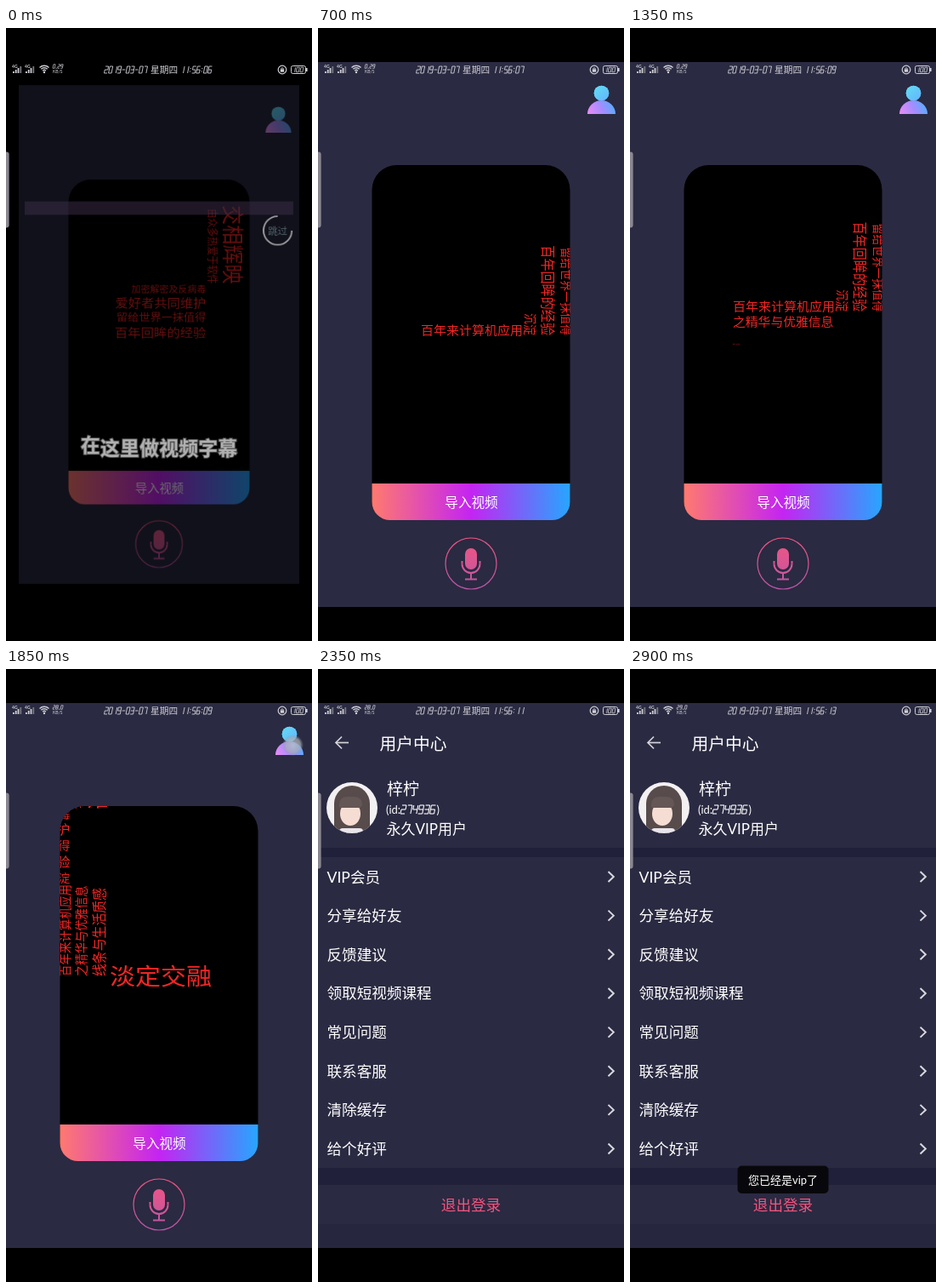
Animation of 360x720 px, one loop 2950 ms. Source, as an HTML page with a canvas:

```html
<!DOCTYPE html>
<html lang="zh-CN">
<head>
<meta charset="utf-8">
<style>
html, body { margin: 0; width: 100%; height: 100%; overflow: hidden; background: #000; }
canvas { display: block; }
</style>
</head>
<body>
<canvas id="stage" width="360" height="720"></canvas>
<script>
const LOOP = 2950, SWITCH = 300;
const BG = '#2a2a42', BAND = '#20203a', RED = '#f42626';
const CJK = '"Noto Sans CJK SC", "Noto Sans CJK", sans-serif';
const LATIN = 'Lato, ' + CJK;
const view = document.getElementById('stage').getContext('2d');
const layer = document.createElement('canvas');
layer.width = 360; layer.height = 720;
let g = view;

const clamp = v => Math.max(0, Math.min(1, v));
const ramp = (t, a, b) => { const k = clamp((t - a) / (b - a)); return k * k * (3 - 2 * k); };
const mix = (a, b, k) => a + (b - a) * k;

function text(s, x, y, size, color = '#fff', align = 'left', weight = 400, font = LATIN) {
  g.font = `${weight} ${size}px ${font}`;
  g.textAlign = align;
  g.textBaseline = 'alphabetic';
  g.fillStyle = color;
  g.fillText(s, x, y + size * 0.37);
}
function rect(x, y, w, h, color, r = 0) {
  g.fillStyle = color;
  g.beginPath();
  g.roundRect(x, y, w, h, r);
  g.fill();
}
function disc(x, y, r, color) {
  g.fillStyle = color;
  g.beginPath();
  g.arc(x, y, r, 0, 7);
  g.fill();
}
function line(points, color, width) {
  g.strokeStyle = color;
  g.lineWidth = width;
  g.beginPath();
  points.forEach(([x, y]) => g.lineTo(x, y));
  g.stroke();
}
function arc(x, y, r, a, b, color, width) {
  g.strokeStyle = color;
  g.lineWidth = width;
  g.beginPath();
  g.arc(x, y, r, a, b);
  g.stroke();
}
function blend(x0, y0, x1, y1, ...colors) {
  const f = g.createLinearGradient(x0, y0, x1, y1);
  colors.forEach((c, i) => f.addColorStop(i / (colors.length - 1), c));
  return f;
}

// Slanted seven-segment lettering; segments a..g
const SEG = {
  0: 'abcdef', 1: 'bc', 2: 'abged', 3: 'abgcd', 4: 'fgbc', 5: 'afgcd',
  6: 'afgedc', 7: 'abc', 8: 'abcdefg', 9: 'abcdfg', '-': 'g'
};
const ENDS = {
  a: [0, 0, 1, 0], b: [1, 0, 1, 1], c: [1, 1, 1, 2], d: [0, 2, 1, 2],
  e: [0, 1, 0, 2], f: [0, 0, 0, 1], g: [0, 1, 1, 1]
};
function digits(s, x, y, w, h, step, color, width = 0.9) {
  const at = (px, py) => [x + px * w + (1 - py / 2) * h * 0.2, y + (py - 1) * h / 2];
  for (const c of s) {
    if (c === ':' || c === '.') {
      for (const p of c === ':' ? [0.6, 1.5] : [2]) {
        const [dx, dy] = at(0.1, p);
        rect(dx, dy - 0.5, 1, 1, color);
      }
      x += step * 0.68;
      continue;
    }
    for (const k of SEG[c]) {
      const [a, b, d, e] = ENDS[k];
      line([at(a, b), at(d, e)], color, width);
    }
    x += step;
  }
}

function statusBar(t) {
  const ink = '#cfcfd6';
  for (const x of [7, 22]) {
    text('4G', x, 45, 5, ink, 'left', 700);
    for (let i = 0; i < 4; i++) rect(x + 1 + i * 2.8, 51 - i * 2, 1.8, 2 + i * 2, i < 3 ? ink : '#77777f');
  }
  for (const r of [2.6, 5.2, 7.8]) arc(45, 52, r, -2.35, -0.79, ink, 1.4);
  disc(45, 52, 1.2, ink);
  digits(t < 1500 ? '0.29' : t < 2400 ? '28.0' : '29.0', 55, 45, 2.2, 4.5, 3.4, ink, 0.7);
  text('KB/S', 55, 51.5, 5, ink);
  digits('2019-03-07', 115.5, 49, 3.5, 8, 5.1, ink);
  text('星期四', 170, 49, 10.7, ink);
  const tick = [400, 850, 1250, 1870, 2090, 2480, 2860].filter(s => t >= s).length;
  digits('11:56:' + String(6 + tick).padStart(2, '0'), 205, 49, 3.5, 8, 5.1, ink);
  arc(325, 49, 4.8, 0, 7, ink, 1.2);
  rect(322.8, 48.3, 4.4, 3.4, ink);
  arc(325, 48.2, 1.4, Math.PI, 0, ink, 0.9);
  g.strokeStyle = ink;
  g.lineWidth = 1;
  g.beginPath();
  g.roundRect(335.5, 44.5, 17, 9, 2);
  g.stroke();
  rect(353, 47, 1.6, 4, ink);
  digits('100', 336.5, 49, 3, 5.5, 4.7, ink, 0.8);
}

// Rows: [text, character size, centre above the block's corner, start, end of growth]
const OLD = [['交相辉映', 28, -33.5], ['由众多热爱于软件', 13.4, -8.5]];
const MID = [
  ['加密解密及反病毒', 12, -91], ['爱好者共同维护', 16.7, -72],
  ['留给世界一抹值得', 14.4, -51.5], ['百年回眸的经验', 16.8, -30], ['沉淀', 14.4, -9, 30, 210]
];
const NEW = [
  ['百年来计算机应用', 15, -52, 480, 640], ['之精华与优雅信息', 14.8, -32, 820, 1020],
  ['线条与生活质感', 16.5, -11, 1325, 1480]
];
function rows(list, t, align) {
  for (const [s, size, y, a, b] of list) {
    const k = a === undefined ? 1 : ramp(t, a, b);
    if (!k) continue;
    g.save();
    g.translate(0, y + size / 2 * (1 - k));
    g.scale(k, k);
    text(s, 0, 0, size, RED, align, 500, CJK);
    g.restore();
  }
}
function verse(t) {
  const turn = Math.PI / 2;
  g.save();
  g.translate(182, 361);
  g.scale(1, 0.9);
  const k = ramp(t, 1580, 1760);
  if (k) {
    g.save();
    g.scale(k, k);
    text('淡定交融', 0, 0, 30, RED, 'center', 500, CJK);
    g.restore();
  }
  g.translate(-61, 0);
  g.rotate(-turn * ramp(t, 1500, 1700));
  g.translate(0, 45.5 - 25 * ramp(t, 800, 1000) - 20.5 * ramp(t, 1290, 1460));
  rows(NEW, t, 'left');
  g.translate(119.5, -45.5);
  g.rotate(turn * ramp(t, 300, 500));
  g.translate(0, 25.5 * (1 - ramp(t, 0, 210)));
  rows(MID, t, 'right');
  g.translate(0, -99);
  g.rotate(turn);
  rows(OLD, t, 'right');
  g.restore();
}

function home(t) {
  rect(0, 40, 360, 640, BG);
  disc(333.5, 76.5, 8.8, blend(325, 68, 342, 86, '#63dcf2', '#62b4ff'));
  g.fillStyle = blend(318, 100, 348, 86, '#e68cf4', '#a58cff', '#4fb0ff');
  g.beginPath();
  g.ellipse(333.5, 101, 16.5, 16, 0, Math.PI, 0);
  g.fill();
  disc(333.5, 76.5, 8.8, blend(325, 68, 342, 86, '#63dcf2', '#62b4ff'));

  g.save();
  g.beginPath();
  g.roundRect(63.5, 161, 233, 417, [29, 29, 21, 21]);
  g.clip();
  rect(63, 161, 234, 417, '#000');
  verse(t);
  rect(63, 535, 234, 43, blend(63, 0, 297, 0, '#ff7a6e', '#c424f2', '#26a6ff'));
  g.restore();
  text('导入视频', 180.5, 557, 15.6, '#fff', 'center');

  const pink = blend(0, 598, 0, 660, '#f4557f', '#bb55a8');
  arc(180, 629, 30, 0, 7, pink, 1.2);
  rect(173, 611, 14, 25, pink, 7);
  arc(180, 629.5, 10.5, 0, Math.PI, pink, 2);
  line([[169.5, 626], [169.5, 629.5]], pink, 2);
  line([[190.5, 626], [190.5, 629.5]], pink, 2);
  line([[180, 640], [180, 647]], pink, 2);
  line([[173, 647.5], [187, 647.5]], pink, 2);
}

function splash() {
  rect(0, 40, 360, 18, 'rgba(62,46,72,.75)');
  arc(339, 79, 19, 0, Math.PI * 1.5, '#d5d5d8', 2.2);
  text('跳过', 339, 79, 13, '#6f8a90', 'center');
  g.lineWidth = 2;
  g.strokeStyle = '#777';
  const s = '在这里做视频字幕';
  [...s].forEach((c, i) => {
    const x = 88 + i * 26.3, y = i ? 370 : 366;
    text(c, x, y, 26, '#fff', 'center', 900, CJK);
    g.strokeText(c, x, y + 26 * 0.37);
    g.fillText(c, x, y + 26 * 0.37);
  });
}

function avatar() {
  g.save();
  g.beginPath();
  g.arc(40, 163, 30, 0, 7);
  g.clip();
  rect(10, 133, 60, 60, '#f3f0f2');
  rect(19, 137, 42, 60, '#574b4b', [21, 21, 6, 6]);
  g.fillStyle = '#f6ddd3';
  g.beginPath();
  g.ellipse(38, 170, 12, 14, 0, 0, 7);
  g.fill();
  rect(25, 150, 27, 13, '#655756', [10, 10, 5, 3]);
  rect(25, 187, 28, 8, '#e8e4ea', 5);
  g.restore();
}

const MENU = ['VIP会员', '分享给好友', '反馈建议', '领取短视频课程', '常见问题', '联系客服', '清除缓存', '给个好评'];
function account(t) {
  rect(0, 40, 360, 640, BG);
  rect(0, 210, 360, 11, BAND);
  rect(0, 586, 360, 20, BAND);
  rect(0, 652, 360, 28, '#26263e');
  line([[36, 86.5], [21, 86.5]], '#d4d4da', 1.7);
  line([[28, 79.5], [21, 86.5], [28, 93.5]], '#d4d4da', 1.7);
  text('用户中心', 72.5, 87.5, 19.8);
  avatar();
  text('梓柠', 81, 141, 19);
  text('(id:', 80, 165, 13);
  digits('274936', 97, 165, 5, 10, 6.9, '#fff', 1.1);
  text(')', 139.5, 165, 13);
  text('永久VIP用户', 80.5, 188, 17);
  MENU.forEach((s, i) => {
    const y = 244 + i * 45.65;
    text(s, 10.5, y, 17.6);
    line([[341.5, y - 6], [347.8, y], [341.5, y + 6]], '#d8d8de', 2);
  });
  text('退出登录', 180, 629, 17.6, '#f4547f', 'center');
  const k = ramp(t, 2610, 2710);
  if (k) {
    g.globalAlpha = k;
    rect(126.5, 583.5, 107, 32.5, '#08080c', 5);
    text('您已经是vip了', 180, 600.5, 13, '#fff', 'center');
    g.globalAlpha = 1;
  }
}

function page(draw, t, scale = 1, cy = 360, alpha = 1) {
  g = layer.getContext('2d');
  g.clearRect(0, 0, 360, 720);
  draw(t);
  g = view;
  g.save();
  g.beginPath();
  g.rect(0, 40, 360, 640);
  g.clip();
  g.globalAlpha = alpha;
  g.translate(180, cy);
  g.scale(scale, scale);
  g.drawImage(layer, -180, -360);
  g.restore();
}
// One page grows in with a slight overshoot while the other sinks away
function swap(next, prev, t, u) {
  const v = u - 1;
  const grow = 1 + 1.8 * v ** 3 + 0.8 * v * v;
  page(next, t, 0.61 + 0.39 * grow, 360, 0.3 + 0.38 * u + 0.32 * u ** 6);
  page(prev, t, 1 - 0.4 * u, 360 + 380 * u + 93 * u * u, 1 - u);
}

function touch(x, y, t, a, b) {
  const k = Math.min(ramp(t, a, a + 50), 1 - ramp(t, b - 50, b));
  if (!k) return;
  g.globalAlpha = k;
  const f = g.createRadialGradient(x, y, 0, x, y, 12.5);
  f.addColorStop(0, 'rgba(185,192,200,.8)');
  f.addColorStop(0.7, 'rgba(165,172,182,.75)');
  f.addColorStop(1, 'rgba(140,150,165,0)');
  disc(x, y, 12.5, f);
  g.globalAlpha = 1;
}

function render(t) {
  g = view;
  rect(0, 0, 360, 720, '#000');
  const first = 0.305 + t / SWITCH, second = (t - 1913) / SWITCH;
  if (first < 1) swap(home, splash, t, first);
  else if (second < 0) page(home, t);
  else if (second < 1) swap(account, home, t, second);
  else page(account, t);
  statusBar(t);
  touch(337.5, 89.5, t, 1770, 1930);
  touch(271, 243, t, 2460, 2640);
  rect(-4, 145.5, 7.6, 89, '#8b8792', 3);
}

let start;
function frame(now) {
  start ??= now;
  render((now - start) % LOOP);
  requestAnimationFrame(frame);
}
render(0);
requestAnimationFrame(frame);
</script>
</body>
</html>
```
